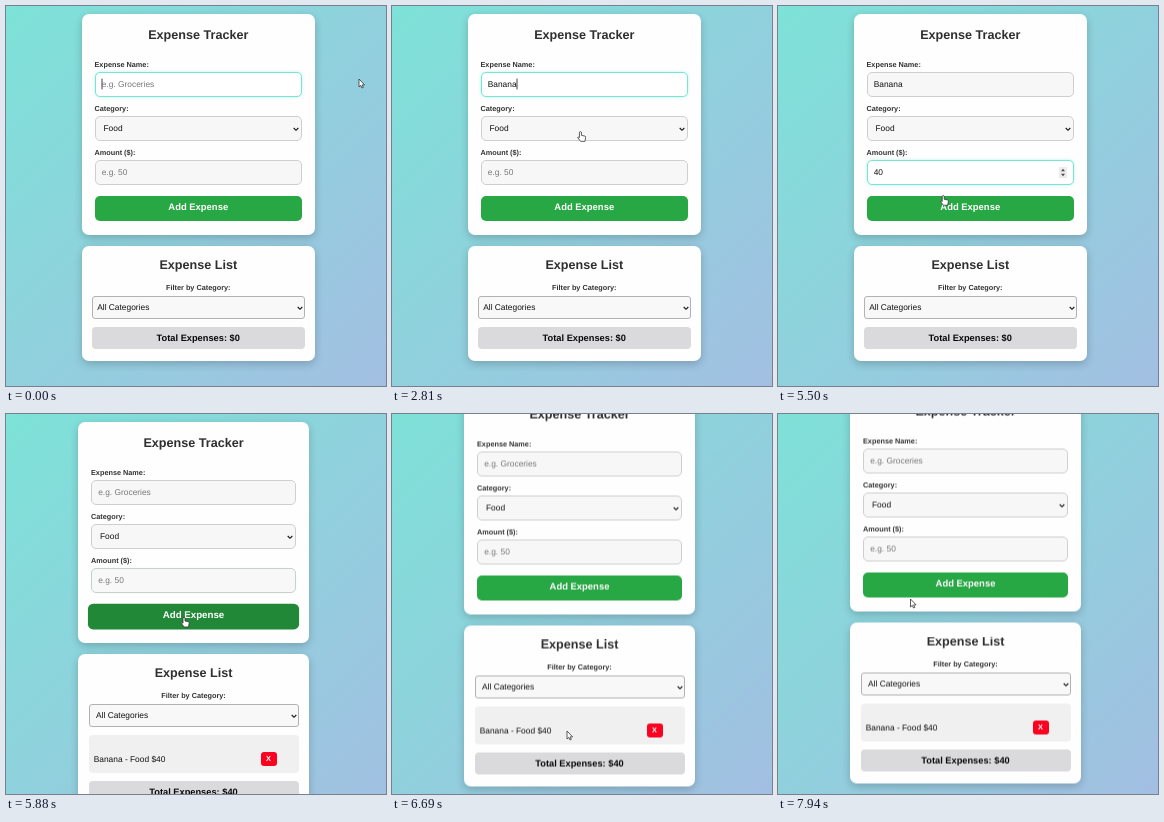
Animation, 380 px wide and 380 px high, one loop 8000 ms. Source, as an HTML page:

```html
<!DOCTYPE html>
<html lang="en">
<head>
<meta charset="utf-8">
<title>Expense Tracker</title>
<style>
  html, body { margin: 0; width: 100%; height: 100%; overflow: hidden; }
  #stage { position: relative; width: 380px; height: 380px; overflow: hidden; background: #7de3d7;
    font: 8.4px/1 "Liberation Sans", Arial, sans-serif; color: #111;
    text-rendering: geometricPrecision; white-space: pre; cursor: default; }
  #stage div, #stage svg { position: absolute; box-sizing: border-box; }
  #page { inset: 0; will-change: transform; }
  #back { left: -188px; width: 760px; top: 0; background: linear-gradient(135deg, #74ebd5, #acb6e5); }
  .card { left: var(--x); width: var(--w); background: #fefefe; border-radius: 7px;
    box-shadow: 0 3px 8px rgba(0, 0, 0, .2); }
  .title { left: 0; right: 0; height: 20px; line-height: 20px; text-align: center;
    font-size: 12.6px; font-weight: bold; color: #2f2f2f; }
  .label { left: 13px; right: 13px; height: 10px; line-height: 10px;
    font-size: 7.3px; font-weight: bold; color: #333; }
  .field { --f: 0%; left: 13px; right: 13px; height: 25px; line-height: 23px; padding-left: 6.2px;
    border: 1px solid color-mix(in srgb, #74e6d3 var(--f), #cfcfcf); border-radius: 5px;
    background: color-mix(in srgb, #fff var(--f), #f7f7f7);
    box-shadow: 0 0 3px color-mix(in srgb, rgba(116, 235, 213, .5) var(--f), transparent); }
  .hint { color: #777; }
  .caret { display: inline-block; width: 0; height: 10px; vertical-align: -2px;
    box-shadow: 0 0 0 .4px #111; }
  .filter { left: 10.5px; right: 10.5px; height: 23px; line-height: 21px;
    border: 1px solid #b2b2b2; border-radius: 3px; background: #f8f8f8; }
  .button { left: 13px; right: 13px; height: 25px; line-height: 24px; border-radius: 5px;
    text-align: center; font-size: 9.45px; font-weight: bold; color: #fff; }
  .total { left: 10.5px; right: 10.5px; height: 22px; line-height: 22px; border-radius: 4px;
    background: #dadadc; text-align: center; font-size: 9.27px; font-weight: bold; color: #080808; }
  .item { left: 10.5px; right: 10.5px; height: 38px; border-radius: 4px; background: #f0f0f0; }
  .item div { top: 17px; height: 14px; line-height: 14px; }
  .remove { right: 22px; width: 16px; border-radius: 3px; background: #fa0320; color: #fff;
    text-align: center; font-size: 7.4px; font-weight: bold; }
  #cursor { left: 0; top: 0; width: 12px; height: 14px; overflow: visible; }
</style>
</head>
<body>
<div id="stage">
  <div id="page">
    <div id="back"></div>
    <div class="card" style="top:8px;height:221px">
      <div class="title" style="top:11px">Expense Tracker</div>
      <div class="label" style="top:45.5px">Expense Name:</div>
      <div class="field" id="name" style="top:58px"><span class="value"></span><i class="caret"></i><span class="hint">e.g. Groceries</span></div>
      <div class="label" style="top:89.5px">Category:</div>
      <div class="field" style="top:102px;padding-left:8px">Food<svg class="chevron" style="right:1.7px;top:9.5px" width="6" height="5"><path d="M.7 1 3 3.3 5.3 1" fill="none" stroke="#111" stroke-width="1.1"/></svg></div>
      <div class="label" style="top:133.5px">Amount ($):</div>
      <div class="field" id="amount" style="top:146px"><span class="value"></span><i class="caret"></i><span class="hint">e.g. 50</span><svg id="spin" style="right:6px;top:6px" width="8" height="11"><path d="M0 0H8V11H0Z" fill="#ececec"/><path d="M2 4.2 4 1.8 6 4.2ZM2 6.8H6L4 9.2Z" fill="#4a4a4a"/></svg></div>
      <div class="button" id="add" style="top:182px">Add Expense</div>
    </div>
    <div class="card" id="list" style="top:240px">
      <div class="title" style="top:8.5px">Expense List</div>
      <div class="label" style="top:37px;text-align:center">Filter by Category:</div>
      <div class="filter" id="filter" style="top:50px">All Categories<svg class="chevron" style="right:1px;top:8.5px" width="6" height="5"><path d="M.7 1 3 3.3 5.3 1" fill="none" stroke="#111" stroke-width="1.1"/></svg></div>
      <div class="item" id="item" style="top:81px"><div style="left:5.2px">Banana - Food $40</div><div class="remove">X</div></div>
      <div class="total" id="total"></div>
    </div>
  </div>
  <svg id="cursor">
    <g fill="#fff" stroke="#333" stroke-width=".8" stroke-linejoin="round">
      <path id="arrow" d="M0 0V8L1.8 6.4 3 9 4.3 8.4 3.1 5.9H5.6Z"/>
      <path id="hand" d="M-1 .8Q0-.4 1 .8V4L4.6 4.8Q5.3 5 5.2 6L4.5 10H.2L-2.8 6.2Q-2.6 5-1 6.2Z"/>
      <path id="beam" d="M-1.4-3.5H1.4M0-3.5V3.5M-1.4 3.5H1.4" fill="none" stroke="#444"/>
    </g>
  </svg>
</div>
<script>
const LOOP = 8000, ADDED = 5750, SWITCH = 3500;
const $ = id => document.getElementById(id);
const clamp = v => Math.min(1, Math.max(0, v));
const mix = (a, b, p) => a + (b - a) * p;

const nameKeys = [250, 530, 780, 1030, 1260, 1510];
const amountKeys = [4250, 4690];

// time, x, y, shape from this point on
const path = [
  [0, 353, 73, 'arrow'], [2000, 353, 73, 'arrow'], [2250, 308, 80, 'arrow'],
  [2400, 275, 88, 'beam'], [2500, 248, 98, 'arrow'], [2750, 196, 119, 'hand'],
  [3000, 165, 145, 'arrow'], [3120, 157, 156, 'beam'], [3310, 151, 163.5, 'beam'],
  [5190, 151, 163.5, 'beam'], [5380, 158, 179, 'arrow'], [5490, 164.5, 188.5, 'hand'],
  [5700, 178, 203, 'hand'], [6250, 178, 203, 'hand'], [6350, 174, 250, 'arrow'],
  [6400, 173, 292, 'hand'], [6440, 173, 305.5, 'hand'], [6600, 175, 317, 'arrow'],
  [6750, 175, 317, 'arrow'], [7030, 190, 306, 'arrow'], [7250, 202, 281, 'hand'],
  [7380, 205, 277, 'hand'], [7590, 205, 277, 'hand'], [7700, 182, 250, 'arrow'],
  [7940, 132.5, 185, 'arrow'], [LOOP, 132.5, 185, 'arrow']
];

function drawCursor(t) {
  const i = path.findLastIndex(k => k[0] <= t);
  const a = path[i], b = path[i + 1] || a;
  const p = a === b ? 0 : (t - a[0]) / (b[0] - a[0]);
  $('cursor').style.transform = `translate(${mix(a[1], b[1], p)}px, ${mix(a[2], b[2], p)}px)`;
  for (const id of ['arrow', 'hand', 'beam']) $(id).style.display = id === a[3] ? '' : 'none';
}

function drawField(id, text, keys, t, from, to) {
  const box = $(id), [value, caret, hint] = box.children;
  const typed = t < ADDED ? text.slice(0, keys.filter(k => k <= t).length) : '';
  const active = t >= from && t < to;
  const last = Math.max(from, ...keys.filter(k => k <= t));
  const focus = clamp((t - from) / 200) * (1 - clamp((t - to) / 200));
  value.textContent = typed;
  hint.style.display = typed ? 'none' : '';
  caret.style.visibility = active && (t - last) % 1000 < 500 ? '' : 'hidden';
  box.style.setProperty('--f', focus * 100 + '%');
}

function draw(t) {
  const added = t >= ADDED;
  const stage = $('stage').style;
  stage.setProperty('--x', added ? '72px' : '75.5px');
  stage.setProperty('--w', added ? '231px' : '233.5px');

  drawField('name', 'Banana', nameKeys, t, -200, SWITCH);
  drawField('amount', '40', amountKeys, t, SWITCH, 5700);
  $('spin').style.display = t >= 3200 && t < ADDED ? '' : 'none';

  const hover = clamp((t - 5510) / 300) * (1 - clamp((t - 6350) / 300));
  const tone = [[40, 33], [167, 136], [69, 56]].map(([a, b]) => mix(a, b, hover));
  $('add').style.background = `rgb(${tone})`;
  $('add').style.transform = `scale(${1 + .03 * hover})`;

  $('list').style.height = added ? '160.5px' : '114.5px';
  $('item').style.display = added ? '' : 'none';
  $('total').style.top = added ? '126.7px' : '81px';
  $('total').textContent = 'Total Expenses: $' + (added ? 40 : 0);
  $('filter').style.paddingLeft = added ? '6.5px' : '4.2px';
  $('back').style.height = added ? '412px' : '380px';

  const scroll = 31.5 * (1 - (1 - clamp((t - 6500) / 350)) ** 3);
  $('page').style.transform = `translateY(${-scroll}px)`;
  drawCursor(t);
}

function tick() {
  draw(performance.now() % LOOP);
  requestAnimationFrame(tick);
}
tick();
</script>
</body>
</html>
```
